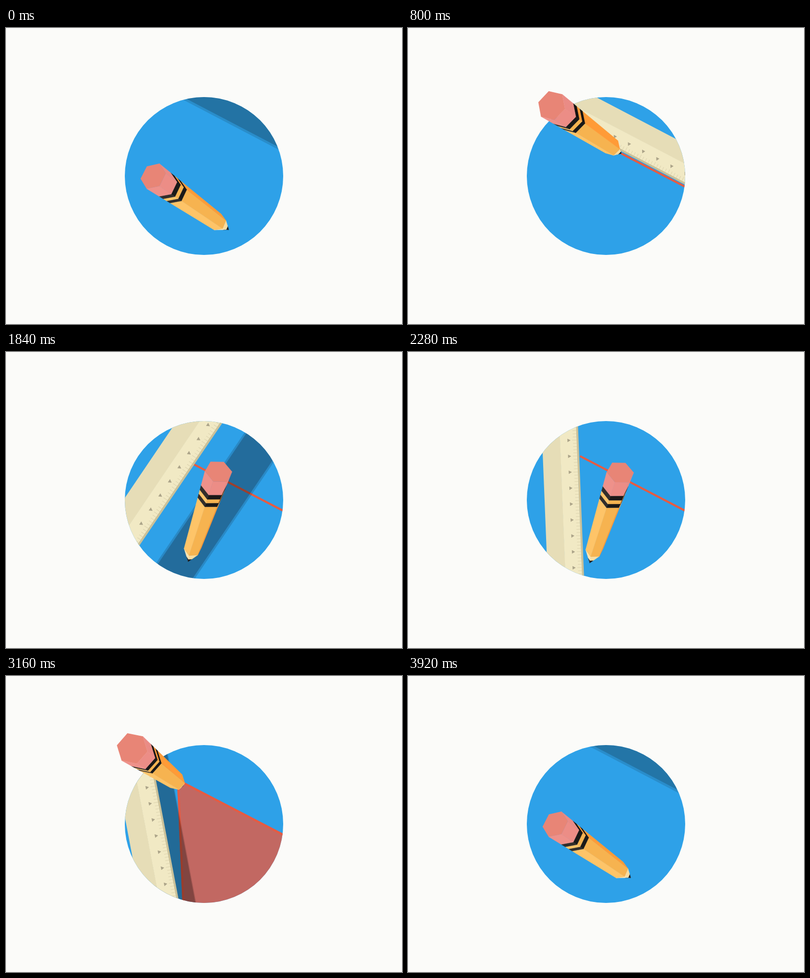
Write an HTML page with a canvas that moves like this. It is 800 px wide and 600 px high and loops after 3.96 s.

```html
<!DOCTYPE html>
<html lang="en">
<head>
<meta charset="utf-8">
<title>Pencil and ruler</title>
<style>
html, body { margin: 0; width: 100%; height: 100%; overflow: hidden; background: #fbfbf9; }
canvas { display: block; width: 800px; height: 600px; }
</style>
</head>
<body>
<canvas id="stage" width="800" height="600"></canvas>
<script>
const ctx = document.getElementById('stage').getContext('2d');
const LOOP = 3960, CX = 400, CY = 300, RAD = 160;
const BLUE = '#2ea1e8', RED = '#e65b42';

const clamp = v => Math.max(0, Math.min(1, v));
const ramp = (t, a, b) => clamp((t - a) / (b - a));
const ease = (t, a, b) => (1 - Math.cos(Math.PI * ramp(t, a, b))) / 2;
const mix = (a, b, p) => a.map((v, i) => v + (b[i] - v) * p);

function poly(points, color) {
  ctx.beginPath();
  points.forEach(p => ctx.lineTo(p[0], p[1]));
  ctx.closePath();
  ctx.fillStyle = color;
  ctx.fill();
}

// ---- Drawn lines and the area between them ----
const APEX = [347.5, 211], RIGHT = [559, 321.3], FOOT = [358.1, 453];
const stroke1 = t => ease(t, 460, 1060);
const stroke2 = t => ease(t, 2370, 2970);
const beyond = (a, b) => mix(a, b, 1.1);

function segment(a, b) {
  ctx.beginPath();
  ctx.moveTo(...a);
  ctx.lineTo(...b);
  ctx.stroke();
}

function drawing(t) {
  const fade = 1 - ease(t, 3480, 3840);
  ctx.lineWidth = 4.2;
  ctx.lineJoin = 'miter';
  ctx.strokeStyle = RED;
  ctx.globalAlpha = fade;
  const p1 = stroke1(t), p2 = stroke2(t);
  if (p1 > 0) segment(beyond(APEX, RIGHT), mix(RIGHT, APEX, p1));
  if (p2 > 0) segment(beyond(APEX, FOOT), mix(FOOT, APEX, p2));
  const fill = ease(t, 2970, 3240) * fade;
  if (fill > 0) {
    ctx.globalAlpha = fill;
    poly([beyond(APEX, RIGHT), [575, 475], beyond(APEX, FOOT), APEX], RED);
    ctx.beginPath();
    ctx.moveTo(...beyond(APEX, RIGHT));
    ctx.lineTo(...APEX);
    ctx.lineTo(...beyond(APEX, FOOT));
    ctx.stroke();
  }
  ctx.globalAlpha = 1;
}

// ---- Ruler ----
function rulerPose(t) {
  const u = t > 3680 ? t - LOOP : t;
  const enter = 1 - ease(u, -280, 520);
  const p = ramp(u, 1164, 2240), swing = ease(u, 1164, 2240);
  const leave = Math.pow(Math.max(0, (u - 2940) / 460), 1.7);
  const arc = Math.sin(Math.PI * p);
  return {
    angle: (27.7 - 120 * swing - 29.3 * leave) * Math.PI / 180,
    dist: 58.7 + 123.6 * enter + Math.max(0, -100 - u) * 0.12 - 8.2 * swing + 91 * leave,
    slide: 11 - 16.4 * swing - 7 * arc,
    lift: 2 * enter + 1.18 * Math.sqrt(Math.max(0, arc)) + Math.min(1.4, Math.pow(leave, 0.6))
  };
}

function ruler(t) {
  const { angle, dist, slide, lift } = rulerPose(t);
  const k = 1 + 0.06 * lift;
  const band = (top, bottom, color) => {
    ctx.fillStyle = color;
    ctx.fillRect(-500, -dist - top, 1000, top - bottom);
  };

  if (lift > 0.01) {
    ctx.save();
    ctx.translate(CX + 85 * lift, CY + 77 * lift);
    ctx.rotate(angle);
    ctx.scale(k, k);
    ctx.globalAlpha = 1 / Math.sqrt(Math.max(1, lift));
    const soft = Math.min(2.2, 1.6 * lift);
    band(73.5 + soft, -soft, 'rgba(14,12,12,.16)');
    band(73.5 - soft, soft, 'rgba(14,12,12,.24)');
    ctx.restore();
  }

  ctx.save();
  ctx.translate(CX, CY);
  ctx.rotate(angle);
  ctx.scale(k, k);
  band(73.5, 37, '#e6ddb7');
  band(37.5, 3.5, '#f1e9c4');
  band(4, 0, '#cbc199');
  for (let n = -50; n <= 50; n++) {
    const x = slide + n * 6.46, major = n % 5 === 0;
    ctx.fillStyle = '#dcd3ae';
    ctx.fillRect(x - 0.5, -dist - (major ? 13 : 11.5), 1, major ? 9 : 7.5);
    if (major) {
      const y = -dist - 19.5;
      poly([[x - 3.6, y - 3], [x + 3.6, y - 3], [x, y + 3.4]], '#aca489');
    }
  }
  ctx.restore();
}

// ---- Pencil: a hexagonal prism in perspective ----
const DEPTH = 600, LENGTH = 312, RADIUS = 15.7, CONE = 0.24;

// time, tip x, tip y, eraser x, eraser y, roll
const POSES = [
  [0, 450, 409, 297, 300, -8],
  [460, 559, 321.3, 370, 185, 0],
  [800, 431, 254.5, 290, 157, 17],
  [1060, 347.5, 211, 256, 153, 28],
  [1140, 347.5, 211, 256, 153, 28],
  [1440, 394, 263, 392, 190, 45],
  [1720, 368, 425, 429.5, 242, 57],
  [2260, 368, 425, 429.5, 242, 57],
  [2370, 358.1, 453, 418, 262, 53],
  [2880, 350, 222, 257, 185, 16],
  [2970, 347.5, 211, 251, 172, 14],
  [3120, 353, 216, 251, 140, 13],
  [3400, 411, 336, 317, 272, 9],
  [3700, 450, 409, 297, 300, -8],
  [LOOP, 450, 409, 297, 300, -8]
];

// Monotone cubic interpolation of one column
function track(t, col) {
  let i = 0;
  while (i < POSES.length - 2 && t >= POSES[i + 1][0]) i++;
  const slope = j => {
    const a = POSES[j], b = POSES[j + 1];
    return a && b ? (b[col] - a[col]) / (b[0] - a[0]) : 0;
  };
  const tangent = j => {
    const a = slope(j - 1), b = slope(j);
    return a * b > 0 ? 2 * a * b / (a + b) : 0;
  };
  const a = POSES[i], b = POSES[i + 1], d = b[0] - a[0];
  const s = (t - a[0]) / d, r = 1 - s;
  return a[col] * r * r * (1 + 2 * s) + b[col] * s * s * (3 - 2 * s)
    + d * s * r * (tangent(i) * r - tangent(i + 1) * s);
}

function tipAt(t) {
  if (t > 460 && t < 1060) return mix(RIGHT, APEX, stroke1(t));
  if (t > 2370 && t < 2970) return mix(FOOT, APEX, stroke2(t));
  return [track(t, 1), track(t, 2)];
}

// Colours per facet, starting at the middle one and going clockwise
const facets = (mid, light, dark) => [mid, light, light, light, dark, dark];
const WOOD = facets('#fbdc9f', '#ffe6b4', '#fff0d0');
const PAINT = facets('#f6b350', '#fec468', '#ff9b37');
const BLACK = facets('#1b1918', '#332e2b', '#141211');
const RUBBER = facets('#ec8d86', '#ee918a', '#ea8b85');
const PARTS = [
  [0, 0.1, BLACK], [0.1, CONE, WOOD], [CONE, 0.814, PAINT], [0.814, 0.845, BLACK],
  [0.845, 0.874, PAINT], [0.874, 0.907, BLACK], [0.907, 1, RUBBER]
];

function pencil(t) {
  const [px, py] = tipAt(t);
  const tx = px - CX, ty = py - CY;
  const ex = track(t, 3) - CX, ey = track(t, 4) - CY;
  const roll = track(t, 5) * Math.PI / 180;

  // Depth of the eraser that keeps the length constant
  const sq = DEPTH * DEPTH;
  const a = ex * ex + ey * ey + sq, b = ex * tx + ey * ty + sq;
  const c = tx * tx + ty * ty + sq - LENGTH * LENGTH;
  const u = (b - Math.sqrt(Math.max(0, b * b - a * c))) / a;
  const axis = [ex * u - tx, ey * u - ty, DEPTH * (1 - u)];
  const len = Math.hypot(...axis);
  const [nx, ny, nz] = axis.map(v => v / len);

  const point = (i, f) => {
    const ang = roll + i * Math.PI / 3;
    const r = RADIUS * Math.min(1, f / CONE);
    const vx = Math.cos(ang), vy = Math.sin(ang);
    const g = (nx * vx + ny * vy) / (1 + nz);
    const x = tx + axis[0] * f + r * (vx - g * nx);
    const y = ty + axis[1] * f + r * (vy - g * ny);
    const z = axis[2] * f - r * g * (1 + nz);
    const s = 1 / (1 - z / DEPTH);
    return [CX + x * s, CY + y * s];
  };
  const area = q => q.reduce((sum, p, i) => {
    const n = q[(i + 1) % q.length];
    return sum + p[0] * n[1] - n[0] * p[1];
  }, 0);

  ctx.lineJoin = 'round';
  ctx.lineWidth = 0.5;
  for (const [from, to, colors] of PARTS) {
    for (let i = 0; i < 6; i++) {
      const quad = [point(i, from), point(i + 1, from), point(i + 1, to), point(i, to)];
      if (area(quad) <= 0) continue;
      poly(quad, colors[i]);
      ctx.strokeStyle = colors[i];
      ctx.stroke();
    }
  }
  poly([0, 1, 2, 3, 4, 5].map(i => point(i, 1)), '#e88576');
}

function render(t) {
  ctx.fillStyle = '#fbfbf9';
  ctx.fillRect(0, 0, 800, 600);
  ctx.save();
  ctx.beginPath();
  ctx.arc(CX, CY, RAD, 0, 2 * Math.PI);
  ctx.fillStyle = BLUE;
  ctx.fill();
  ctx.clip();
  drawing(t);
  ruler(t);
  ctx.restore();
  pencil(t);
}

const start = performance.now();
function tick() {
  render((performance.now() - start) % LOOP);
  requestAnimationFrame(tick);
}
tick();
</script>
</body>
</html>
```
